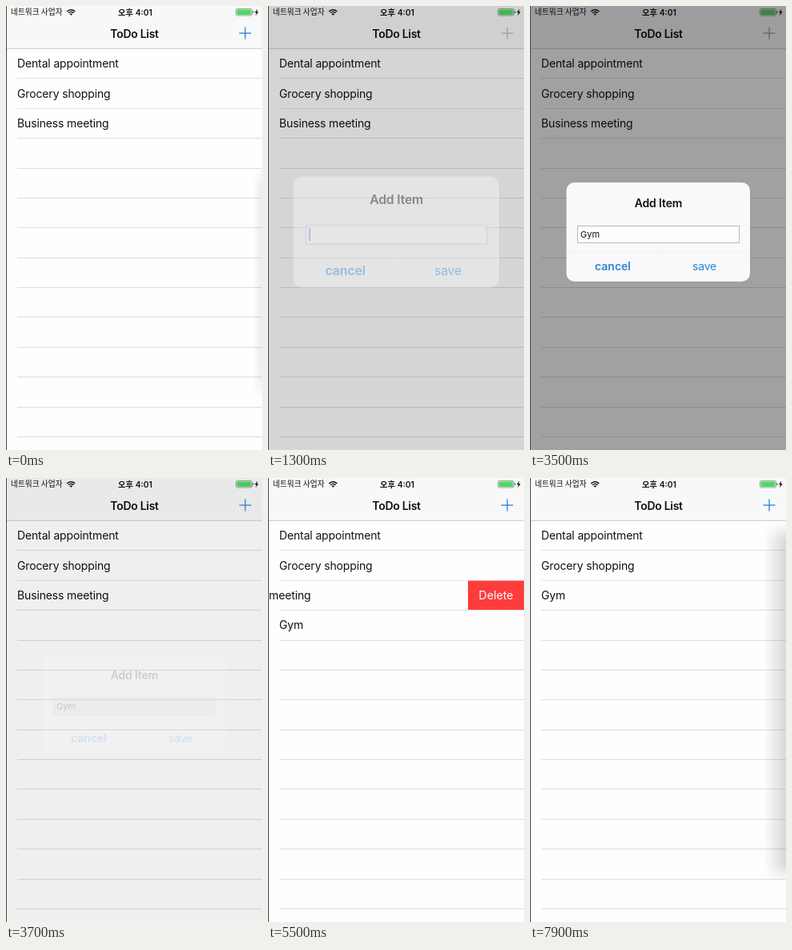
An HTML page with a canvas that plays this animation: 320x556 px, repeating every 8000 ms.

```html
<!DOCTYPE html>
<html lang="en">
<head>
<meta charset="utf-8">
<title>ToDo List</title>
<style>
  html, body { margin: 0; width: 100%; height: 100%; overflow: hidden; background: #fefefe; }
  canvas { display: block; width: 320px; height: 556px; }
</style>
</head>
<body>
<canvas id="stage"></canvas>
<script>
const W = 320, H = 556, LOOP = 8000;
const TOP = 53.4, PITCH = 37.4;
const SANS = 'Inter, "Noto Sans CJK KR", "Noto Sans CJK", sans-serif';
const KOREAN = '"Noto Sans CJK KR", "Noto Sans CJK", sans-serif';

const canvas = document.getElementById('stage');
const ctx = canvas.getContext('2d');
const dpr = window.devicePixelRatio || 1;
canvas.width = W * dpr;
canvas.height = H * dpr;

const clamp = v => Math.max(0, Math.min(1, v));
const span = (t, from, to) => clamp((t - from) / (to - from));
const smooth = p => p * p * (3 - 2 * p);
const easeOut = p => 1 - (1 - p) ** 3;
const mix = (a, b, p) => a + (b - a) * p;
const rgb = (a, b, p) => `rgb(${a.map((v, i) => Math.round(mix(v, b[i], p)))})`;

function text(str, x, y, size, { weight = 400, color = '#111', align = 'left', spacing = -0.14, family = SANS } = {}) {
  ctx.font = `${weight} ${size}px ${family}`;
  ctx.letterSpacing = spacing + 'px';
  ctx.textAlign = align;
  ctx.fillStyle = color;
  ctx.fillText(str, x, y);
}

function rect(x, y, w, h, color) {
  ctx.fillStyle = color;
  ctx.fillRect(x, y, w, h);
}

function roundRect(x, y, w, h, r, color) {
  ctx.beginPath();
  ctx.roundRect(x, y, w, h, r);
  ctx.fillStyle = color;
  ctx.fill();
}

function wifi(x, y) {
  ctx.strokeStyle = ctx.fillStyle = '#111';
  ctx.lineWidth = 1.5;
  for (const r of [4.4, 7]) {
    ctx.beginPath();
    ctx.arc(x, y, r, -Math.PI * 0.76, -Math.PI * 0.24);
    ctx.stroke();
  }
  ctx.beginPath();
  ctx.moveTo(x, y);
  ctx.arc(x, y, 2.4, -Math.PI * 0.76, -Math.PI * 0.24);
  ctx.fill();
}

function battery() {
  ctx.beginPath();
  ctx.roundRect(287.5, 3.5, 20, 8.5, 1.8);
  ctx.strokeStyle = '#777';
  ctx.lineWidth = 0.7;
  ctx.stroke();
  roundRect(288.5, 4.5, 18, 6.5, 1, '#4cd964');
  rect(308.3, 6.2, 1.2, 3, '#777');
  ctx.beginPath();
  [[314.4, 3.5], [310.9, 8.3], [313, 8.3], [312, 12.3], [315.7, 7.2], [313.5, 7.2]]
    .forEach(p => ctx.lineTo(...p));
  ctx.fillStyle = '#111';
  ctx.fill();
}

function plusColor(t, dim) {
  const blue = [38, 132, 220], pale = [172, 213, 236], gray = [160, 160, 162];
  if (t < 1000) return rgb(blue, blue, 0);
  if (t < 1200) return rgb(pale, pale, 0);
  if (t < 2000) return rgb(pale, gray, span(t, 1200, 1500));
  return rgb(blue, gray, dim);
}

function navBar(t, dim) {
  rect(0, 0, W, 53, '#f8f8f9');
  rect(0, 53, W, 0.8, '#c4c4c8');
  text('네트워크 사업자', 6, 11.3, 9.7, { family: KOREAN, spacing: 0 });
  wifi(81.3, 11.8);
  text('오후 4:01', 161.5, 11.6, 10.3, { weight: 600, align: 'center', spacing: 0 });
  battery();
  text('ToDo List', 160.5, 40, 14, { weight: 600, align: 'center', spacing: -0.3 });
  const color = plusColor(t, dim);
  rect(291.5, 33.4, 15, 1.3, color);
  rect(298.4, 26.5, 1.3, 15, color);
}

function row(label, slot, shift = 0) {
  const y = TOP + PITCH * slot;
  rect(0, y + 0.6, W, PITCH - 0.6, '#fefefe');
  text(label, 14 - shift, y + 23.8, 14);
  if (shift > 0) {
    const x = Math.round(325 - shift);
    rect(x, y + 0.4, W - x + 80, PITCH, '#fd3d3b');
    text('Delete', x + 35, y + 24, 14.3, { color: '#fff', align: 'center', spacing: 0 });
  }
  rect(14, Math.round(y + PITCH - 0.5), W, 1, '#dddde0');
}

function list(t) {
  for (let i = 3; i < 14; i++) rect(14, Math.round(TOP + PITCH * i - 0.5), W, 1, '#dddde0');
  const gone = smooth(span(t, 6250, 6600));
  const swipe = 75 * easeOut(span(t, 4950, 5400));
  row('Dental appointment', 0);
  row('Grocery shopping', 1);
  if (gone < 1) row('Business meeting', 2, swipe + 250 * gone);
  if (t >= 3780) row('Gym', 3 - gone);
}

// Soft grey along the right edge
function edgeShade(x, top, bottom, strength) {
  if (strength <= 0) return;
  const steps = 12, h = 24;
  for (let y = top; y < bottom; y += h / steps) {
    const fade = clamp((y - top) / h) * clamp((bottom - y) / h);
    const g = ctx.createLinearGradient(x, 0, W, 0);
    g.addColorStop(0, 'rgba(60,60,60,0)');
    g.addColorStop(1, `rgba(60,60,60,${strength * fade})`);
    rect(x, y, W - x, h / steps, g);
  }
}

function alertBox(t, alpha, scale) {
  ctx.save();
  ctx.globalAlpha = alpha;
  ctx.translate(160, 283);
  ctx.scale(scale, scale);
  ctx.translate(-160, -283);
  roundRect(45.5, 221, 229.5, 124, 10, '#f9f8fa');
  text('Add Item', 160.5, 251.5, 14, { weight: 600, align: 'center' });

  rect(59, 275, 203, 22, '#b9b9bd');
  rect(60, 276, 201, 20, '#fefefe');
  const typed = 'Gym'.slice(0, [1900, 2300, 2600].filter(at => t >= at).length);
  text(typed, 63, 290, 11, { spacing: 0 });
  const caretOn = t < 2700 || (t - 2700) % 1000 < 500;
  if (caretOn && t < 3550) {
    rect(63 + ctx.measureText(typed).width, 279, 1.4, 14, '#4277dd');
  }

  rect(45.5, 307, 229.5, 0.6, '#ebeaed');
  rect(160, 307, 0.6, 38, '#f0eff2');
  text('cancel', 103.5, 331, 14, { weight: 600, color: '#2c87cf', align: 'center', spacing: 0 });
  text('save', 218, 331, 14, { color: '#2c87cf', align: 'center' });
  ctx.restore();
}

function draw(t) {
  ctx.setTransform(dpr, 0, 0, dpr, 0, 0);
  rect(0, 0, W, H, '#fefefe');

  const enter = span(t, 1150, 1500);
  const leave = span(t, 3550, 3800);
  const dim = enter * (1 - leave) ** 2;

  list(t);
  navBar(t, dim);
  edgeShade(308, 200, 490, 0.09 * (1 - span(t, 300, 900)));
  edgeShade(292, 54, 505, 0.2 * span(t, 6800, 7500));

  if (dim > 0) {
    rect(0, 0, W, H, `rgba(0,0,4,${0.37 * dim})`);
    alertBox(t, dim, mix(1.2, 1, smooth(enter)));
  }
  rect(0, 0, 1, H, '#4a4a4c');
}

function loop(now) {
  draw(now % LOOP);
  requestAnimationFrame(loop);
}
draw(0);
requestAnimationFrame(loop);
</script>
</body>
</html>
```
